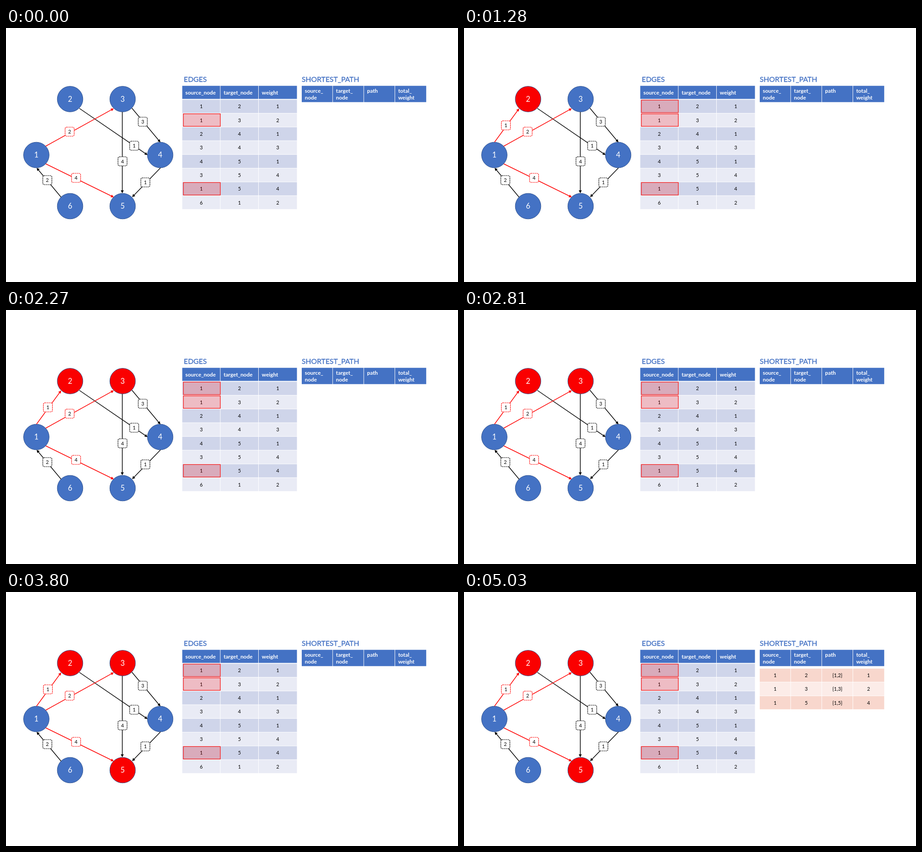
An HTML page that plays this animation: 998x561 px, repeating every 7.09 s.

```html
<!DOCTYPE html>
<html lang="en">
<head>
<meta charset="utf-8">
<title>Shortest path: first step</title>
<style>
  html, body { margin: 0; width: 100%; height: 100%; overflow: hidden; background: #fff; }
  svg { position: absolute; left: 0; top: 0; font-family: Lato, "Open Sans", sans-serif; }
  #results {
    left: 653px; top: 169px;
    -webkit-mask: linear-gradient(to left, transparent, #000 34px) -309px 0 / 309px 100% no-repeat;
    mask: linear-gradient(to left, transparent, #000 34px) -309px 0 / 309px 100% no-repeat;
    animation: wipe 7090ms linear infinite;
  }
  .title { font-size: 15.9px; fill: #4472c4; stroke: #4472c4; stroke-width: .35px; }
  .head { font-size: 11.9px; font-weight: 700; fill: #fff; }
  .cell { font-size: 11px; text-anchor: middle; }
  .node circle { fill: #4472c4; stroke: #2f528f; }
  .node text { font-size: 16.4px; fill: #fff; text-anchor: middle; }
  .edge line { stroke-width: 1.5px; }
  .edge rect { fill: #fff; stroke-width: 1.2px; stroke-dasharray: 3 1; }
  .mark { fill: rgba(255, 0, 0, .2); stroke: #f51616; stroke-width: 1.3px; }

  .blink2 { animation: blink2 7090ms step-end infinite; }
  .blink3 { animation: blink3 7090ms step-end infinite; }
  .blink5 { animation: blink5 7090ms step-end infinite; }
  #node2 circle { animation: fill2 7090ms step-end infinite; }
  #node3 circle { animation: fill3 7090ms step-end infinite; }
  #node5 circle { animation: fill5 7090ms step-end infinite; }

  @keyframes blink2 {
    0%, 7.475%, 14.527% { visibility: hidden; }
    3.949%, 11.001%, 18.053%, 100% { visibility: visible; }
  }
  @keyframes blink3 {
    21.579%, 28.49%, 35.543% { visibility: hidden; }
    0%, 25.528%, 32.016%, 39.633%, 100% { visibility: visible; }
  }
  @keyframes blink5 {
    43.159%, 50.07%, 57.122% { visibility: hidden; }
    0%, 46.544%, 53.596%, 60.648%, 100% { visibility: visible; }
  }
  @keyframes fill2 {
    0% { fill: #4472c4; animation-timing-function: steps(7); }
    3.949% { fill: #f0060a; }
    7.475%, 100% { fill: #fa0000; }
  }
  @keyframes fill3 {
    0% { fill: #4472c4; }
    21.579% { fill: #4472c4; animation-timing-function: steps(7); }
    25.528%, 100% { fill: #fa0000; }
  }
  @keyframes fill5 {
    0% { fill: #4472c4; }
    43.159% { fill: #4472c4; animation-timing-function: steps(6); }
    46.544% { fill: #f0060a; }
    50.07%, 100% { fill: #fa0000; }
  }
  @keyframes wipe {
    0% { -webkit-mask-position: -309px 0; mask-position: -309px 0; }
    64.174% {
      -webkit-mask-position: -309px 0; mask-position: -309px 0;
      animation-timing-function: steps(12);
    }
    70.944%, 100% { -webkit-mask-position: 0 0; mask-position: 0 0; }
  }
</style>
</head>
<body>
<svg id="stage" width="998" height="561" viewBox="0 0 998 561"></svg>
<svg id="results" width="275" height="91" viewBox="653 169 275 91"></svg>
<script>
const text = (x, y, s, cls = '') => `<text class="${cls}" x="${x}" y="${y}">${s}</text>`;
const rect = (x, y, w, h, fill) => `<rect x="${x}" y="${y}" width="${w}" height="${h}" fill="${fill}"/>`;

function node(id, x, y) {
  return `<g class="node" id="node${id}"><circle cx="${x}" cy="${y}" r="28.3"/>${text(x, y + 5.9, id)}</g>`;
}

function edge(weight, x1, y1, x2, y2, lx, ly, blink) {
  const angle = Math.atan2(y2 - y1, x2 - x1);
  const ex = x2 - 5 * Math.cos(angle), ey = y2 - 5 * Math.sin(angle);
  const color = blink ? '#f00' : '#000';
  return `<g class="edge ${blink || ''}">
    <line x1="${x1}" y1="${y1}" x2="${ex}" y2="${ey}" stroke="${color}"/>
    <path d="M0 0L-6.4 -3.3V3.3Z" fill="${color}"
      transform="translate(${x2} ${y2}) rotate(${angle * 180 / Math.PI})"/>
    <rect x="${lx - 10}" y="${ly - 10}" width="20" height="20" rx="3.4" stroke="${color}"/>
    ${text(lx, ly + 4, weight, 'cell')}</g>`;
}

// Rows of centred values on alternating bands, with a 1px gap between cells
function tableRows(rows, left, top, colWidth, rowHeight, fills) {
  return rows.map((row, r) => row.map((value, c) => {
    const x = left + c * colWidth, y = top + r * rowHeight;
    return rect(x, y, colWidth - (c < row.length - 1), rowHeight - 1, fills[r % 2]) +
      text(x + colWidth / 2 - .3, y + rowHeight / 2 + 3.7, value, 'cell');
  }).join('')).join('');
}

function tableHead(labels, left, colWidth, height) {
  return labels.map((label, c) => {
    const x = left + c * colWidth;
    const lines = label.split('|');
    return rect(x, 127.7, colWidth - (c < labels.length - 1), height, '#4472c4') +
      lines.map((s, i) => text(x + 6.8, (lines.length > 1 || height > 30 ? 142.9 : 146.5) + i * 15, s, 'head')).join('');
  }).join('');
}

const mark = (row, blink) =>
  `<rect class="mark ${blink}" x="391.6" y="${159.2 + row * 30.35}" width="81.6" height="27.6"/>`;

const edgeRows = [
  [1, 2, 1], [1, 3, 2], [2, 4, 1], [3, 4, 3],
  [4, 5, 1], [3, 5, 4], [1, 5, 4], [6, 1, 2]
];
const pathRows = [2, 3, 5].map((n, i) => [1, n, `{1,${n}}`, [1, 2, 4][i]]);

document.getElementById('stage').innerHTML =
  node(1, 67, 280.5) + node(2, 141.5, 157) + node(3, 257.5, 157) +
  node(4, 340.5, 280.5) + node(5, 257.5, 393.5) + node(6, 141.5, 393.5) +
  edge(1, 162, 177.5, 312.5, 280.5, 283, 260) +
  edge(3, 278, 177, 341, 252.5, 302, 207) +
  edge(4, 256.7, 185.5, 256.7, 365, 257.3, 294.5) +
  edge(1, 341, 309, 278.5, 373.5, 307.7, 341) +
  edge(2, 121.5, 373.5, 67.7, 309, 91.3, 336) +
  edge(1, 67.5, 252, 121.8, 177.7, 92.5, 215, 'blink2') +
  edge(2, 87.7, 261, 238, 177.7, 140.5, 229, 'blink3') +
  edge(4, 87.7, 300, 238, 373.7, 154.7, 331, 'blink5') +
  text(392.6, 118.8, 'EDGES', 'title') +
  tableHead(['source_node', 'target_node', 'weight'], 389.2, 84.4, 28.9) +
  tableRows(edgeRows, 389.2, 158.5, 84.4, 30.33, ['#cfd5ea', '#e9ebf5']) +
  mark(0, 'blink2') + mark(1, 'blink3') + mark(6, 'blink5') +
  text(653, 119, 'SHORTEST_PATH', 'title') +
  tableHead(['source_|node', 'target_|node', 'path', 'total_|weight'], 653, 68.7, 36);

document.getElementById('results').innerHTML =
  tableRows(pathRows, 653, 169.2, 68.7, 30.3, ['#f8d7cd', '#fcece8']);
</script>
</body>
</html>
```
